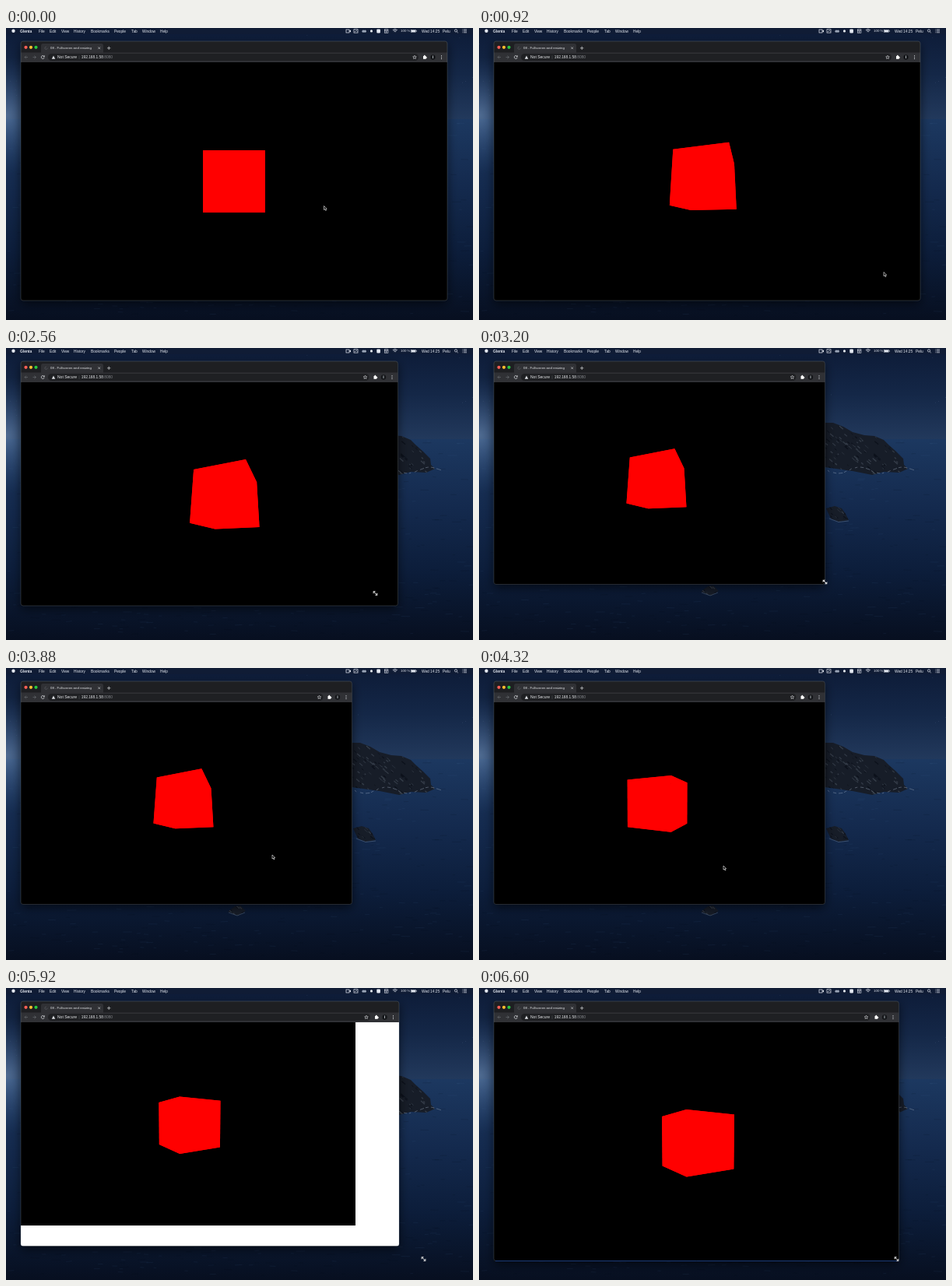
Animation, 600 px wide and 375 px high, one loop 6640 ms. Source, as an HTML page with a canvas:

```html
<!DOCTYPE html>
<html lang="en">
<head>
<meta charset="utf-8">
<title>Fullscreen and resizing</title>
<style>
html, body { margin: 0; width: 100%; height: 100%; overflow: hidden; background: #0a1630; }
canvas { display: block; }
</style>
</head>
<body>
<canvas id="stage" width="600" height="375"></canvas>
<script>
const c = document.getElementById('stage').getContext('2d');
const LOOP = 6640, STEP = 40;
const LEFT = 19, TOP = 17, PAGE = 44;

// Keyframes: time, then two values
const cursorKeys = [
  [160, 408.5, 228.5], [480, 396, 216], [560, 396, 216], [760, 470, 280], [920, 520, 313.5],
  [1360, 552, 337], [1600, 566.5, 349.5], [2260, 566.5, 349.5], [2560, 474.5, 315],
  [2780, 444.5, 300.5], [3280, 444.5, 300.5], [3400, 400, 254], [3700, 345, 240],
  [4120, 338, 240], [4320, 314, 254], [4480, 296, 255], [4560, 296, 255],
  [4760, 452, 293], [4900, 444.5, 301], [5480, 444.5, 301], [5880, 536.5, 348]
];
const windowKeys = [
  [2360, 567, 350], [2560, 503.5, 331], [2720, 482, 321], [2960, 444.5, 303.5],
  [5560, 444.5, 303.5], [5880, 505, 331.5], [6119, 505, 331.5], [6120, 539.5, 350.5]
];
const viewKeys = [
  [2440, 567, 350], [2560, 551.5, 345.5], [2720, 500, 330], [3000, 444.5, 303.5],
  [5800, 444.5, 303.5], [5920, 449, 305], [6279, 449, 305], [6280, 539.5, 350.5]
];
const orbitKeys = [
  [200, 0, 0], [500, 7, 9], [700, 11, 13], [920, 14.5, 15], [1200, 18.5, 16.4], [1500, 20, 16.9],
  [1900, 20.5, 17], [4120, 20.5, 17], [4200, 22, 10], [4320, 28, -1], [4480, 40, -2],
  [4640, 48, -2.2], [4880, 54, -2.3], [5200, 56.5, -2.3], [5500, 57, -2.3]
];

function at(keys, t) {
  const i = keys.findIndex(k => k[0] > t);
  if (i === 0) return keys[0].slice(1);
  if (i < 0) return keys[keys.length - 1].slice(1);
  const a = keys[i - 1], b = keys[i], u = (t - a[0]) / (b[0] - a[0]);
  return [a[1] + (b[1] - a[1]) * u, a[2] + (b[2] - a[2]) * u];
}

function seeded(s) {
  return () => (s = (s * 16807) % 2147483647) / 2147483647;
}

function rect(x, y, w, h, fill) {
  c.fillStyle = fill;
  c.fillRect(x, y, w, h);
}

function round(x, y, w, h, r, fill) {
  c.beginPath();
  c.roundRect(x, y, w, h, r);
  c.fillStyle = fill;
  c.fill();
}

function dot(x, y, r, fill) {
  c.beginPath();
  c.arc(x, y, r, 0, 7);
  c.fillStyle = fill;
  c.fill();
}

function trace(points) {
  c.beginPath();
  for (let i = 0; i < points.length; i += 2) c.lineTo(points[i], points[i + 1]);
}

function poly(points, fill) {
  trace(points);
  c.closePath();
  c.fillStyle = fill;
  c.fill();
}

function line(points, color, width = 0.7) {
  trace(points);
  c.strokeStyle = color;
  c.lineWidth = width;
  c.stroke();
}

function ring(x, y, r, color, from = 0, to = 7, width = 0.7) {
  c.beginPath();
  c.arc(x, y, r, from, to);
  c.strokeStyle = color;
  c.lineWidth = width;
  c.stroke();
}

function text(s, x, y, size, fill = '#e8eaed', weight = '') {
  c.font = `${weight} ${size}px "Liberation Sans", Arial, sans-serif`;
  c.fillStyle = fill;
  c.fillText(s, x, y);
}

function fade(y0, y1, stops) {
  const g = c.createLinearGradient(0, y0, 0, y1);
  stops.forEach((s, i) => g.addColorStop(i / (stops.length - 1), s));
  return g;
}

// A rock with seeded lighter cracks
function rock(points, seed, cracks) {
  const rnd = seeded(seed);
  const xs = points.filter((_, i) => i % 2 === 0), ys = points.filter((_, i) => i % 2);
  const x0 = Math.min(...xs), y0 = Math.min(...ys);
  const w = Math.max(...xs) - x0, h = Math.max(...ys) - y0;
  c.save();
  poly(points, '#171d28');
  c.clip();
  for (let i = 0; i < cracks; i++) {
    const x = x0 + rnd() * w, y = y0 + rnd() * h, n = 2 + rnd() * 5;
    line([x, y, x + n * 0.7, y + n * 0.6], rnd() < 0.5 ? '#333b47' : '#0c111b', 0.5 + rnd());
  }
  c.restore();
}

function desktop() {
  const rnd = seeded(77);
  rect(0, 0, 600, 117, fade(0, 117, ['#0d1b37', '#142747', '#22395c']));
  rect(0, 117, 600, 258, fade(117, 375, ['#1c3860', '#142a4e', '#0c1d3a', '#070f20']));
  for (let i = 0; i < 35; i++) dot(rnd() * 600, 9 + rnd() * 90, 0.3, 'rgba(190,210,240,.4)');
  for (let i = 0; i < 420; i++) {
    const x = rnd() * 600, y = 119 + rnd() * 250, n = 3 + rnd() * 9;
    line([x, y, x + n, y + rnd() - 0.5], rnd() < 0.5 ? 'rgba(70,105,155,.13)' : 'rgba(2,8,22,.16)', 0.8);
  }
  const glow = c.createRadialGradient(0, 112, 0, 0, 112, 75);
  glow.addColorStop(0, 'rgba(125,158,200,.5)');
  glow.addColorStop(1, 'rgba(60,95,145,0)');
  rect(0, 8, 90, 190, glow);
  rock([420, 95, 444, 96, 455, 96, 468, 101, 480, 108, 495, 112, 508, 113, 520, 118, 527, 125,
    536, 133, 545, 142, 546, 150, 551, 155, 540, 160, 520, 159, 505, 163, 480, 158, 444, 153, 420, 152], 9, 170);
  for (let i = 0; i < 16; i++) {
    const x = 448 + i * 7;
    line([x, 157 + 4 * Math.sin(i * 0.8), x + 2 + rnd() * 4, 157 + 4 * Math.sin(i * 0.8 + 0.5)],
      'rgba(170,185,205,.55)', 0.7);
  }
  rock([446, 206, 457, 203, 466, 206, 471, 213, 475, 221, 462, 223, 452, 219], 21, 25);
  line([450, 219, 462, 223.5, 475, 222], 'rgba(150,170,195,.5)', 0.6);
  rock([285, 313, 294, 306, 301, 305, 308, 312, 298, 318], 33, 14);
  line([286, 314, 297, 318, 307, 314], 'rgba(150,170,195,.5)', 0.6);
}

function menuBar() {
  const ink = '#e4e9f2';
  rect(0, 0, 600, 7.7, '#101c35');
  dot(9.5, 3.8, 2.2, ink);
  text('Glenta', 18, 5.5, 4.9, ink, 'bold');
  const items = { File: 42, Edit: 56, View: 71, History: 87, Bookmarks: 109, People: 139, Tab: 161, Window: 175, Help: 198 };
  for (const name in items) text(name, items[name], 5.5, 4.8, ink);
  c.strokeStyle = ink;
  c.lineWidth = 0.7;
  c.strokeRect(437, 2, 4, 4);
  rect(441.5, 2.8, 1.5, 2.4, ink);
  c.strokeRect(447, 1.7, 5, 4.4);
  line([448, 5, 450, 3, 451.5, 4.5], ink, 0.6);
  dot(459, 4.2, 1.6, '#9aa5b8');
  dot(461.3, 4.2, 1.6, '#9aa5b8');
  dot(469.5, 3.9, 1.6, ink);
  round(476.3, 1.4, 4.6, 5, 1, ink);
  c.strokeRect(486.3, 1.8, 4.6, 4.4);
  line([486, 3.3, 491, 3.3], ink);
  line([488.6, 3.3, 488.6, 6], ink);
  for (const r of [1.5, 3, 4.5]) ring(499.8, 6, r, ink, -2.3, -0.84);
  text('100 %', 507, 5.4, 4.4, ink);
  c.strokeStyle = ink;
  c.lineWidth = 0.5;
  c.strokeRect(520.3, 2.3, 6.2, 3.2);
  rect(520.9, 2.8, 5, 2.2, ink);
  rect(527, 3.2, 0.7, 1.4, ink);
  text('Wed 14:25', 534, 5.5, 4.8, ink);
  text('Pelu', 561, 5.5, 4.8, ink);
  ring(578, 3.4, 1.6, ink);
  line([579.2, 4.6, 580.8, 6.2], ink);
  for (const y of [2, 3.9, 5.8]) {
    rect(586.5, y - 0.4, 0.8, 0.8, ink);
    line([588, y, 592, y], ink);
  }
}

function arrow(x, y, dir, color) {
  line([x - 2 * dir, y, x + 2 * dir, y], color);
  line([x, y - 2, x + 2 * dir, y, x, y + 2], color);
}

function toolbar(right) {
  const ink = '#dadce0', dim = '#66696e';
  rect(LEFT, TOP, right - LEFT, 15, '#1e1f22');
  round(45, 20, 80, 13, [2.5, 2.5, 0, 0], '#303135');
  rect(LEFT, 31.5, right - LEFT, 12.5, '#303135');
  ['#ff5f57', '#febc2e', '#28c840'].forEach((fill, i) => dot(25.5 + i * 6.5, 24.8, 2.1, fill));
  ring(51.5, 25.8, 1.6, '#595c61', 0, 5);
  text('08 - Fullscreen and resizing', 57, 27.4, 4.3);
  line([118.3, 24.4, 121, 27.1], ink, 0.6);
  line([121, 24.4, 118.3, 27.1], ink, 0.6);
  line([130, 25.8, 134.4, 25.8], ink);
  line([132.2, 23.6, 132.2, 28], ink);
  arrow(26, 37.5, -1, dim);
  arrow(36.5, 37.5, 1, dim);
  ring(47.3, 37.5, 2, ink, 0.3, 5.5);
  poly([49.6, 35, 49.6, 37.3, 47.4, 37.3], ink);
  round(54, 33, right - 37 - 54, 9, 4.5, '#1f2023');
  poly([58.8, 39.7, 61, 35.5, 63.2, 39.7], ink);
  text('Not Secure', 66, 39.3, 5);
  line([94, 35.3, 94, 40], '#55585d', 0.5);
  text('192.168.1.58', 96.8, 39.3, 4.8);
  text(':8080', 124.9, 39.3, 4.8, '#85888d');

  const star = [];
  for (let i = 0; i < 11; i++) {
    const r = i % 2 ? 1.1 : 2.4, a = i * Math.PI / 5;
    star.push(right - 42 + r * Math.sin(a), 37.6 - r * Math.cos(a));
  }
  line(star, ink, 0.6);
  rect(right - 31, 36, 3.7, 3.8, '#fff');
  dot(right - 29.2, 35.6, 0.9, '#fff');
  dot(right - 27.1, 37.9, 0.9, '#fff');
  dot(right - 18.5, 37.5, 3.2, '#15171a');
  rect(right - 19, 35.5, 1, 3.5, '#a4a9ae');
  for (const y of [35.6, 37.5, 39.4]) dot(right - 7.5, y, 0.55, ink);
}

function cube(cx, cy, focal, yaw, pitch) {
  const sa = Math.sin(yaw), ca = Math.cos(yaw), sp = Math.sin(pitch), cp = Math.cos(pitch);
  const pts = [];
  for (let i = 0; i < 8; i++) {
    const x = (i & 1) - 0.5, y = (i >> 1 & 1) - 0.5, z = (i >> 2) - 0.5;
    const depth = x * sa + z * ca;
    const k = focal / (3 + y * sp - depth * cp);
    pts.push([cx + (x * ca - z * sa) * k, cy - (y * cp + depth * sp) * k]);
  }
  for (const face of ['0132', '4576', '0154', '2376', '0264', '1375'])
    poly([...face].flatMap(i => pts[i]), '#f00');
}

function browser(t) {
  const [right, bottom] = at(windowKeys, t), [vr, vb] = at(viewKeys, t);
  const [yaw, pitch] = at(orbitKeys, t).map(d => d * Math.PI / 180);
  const w = right - LEFT, h = bottom - TOP;
  c.save();
  c.shadowColor = 'rgba(0,0,0,.6)';
  c.shadowBlur = 13;
  c.shadowOffsetY = 4;
  round(LEFT, TOP, w, h, 3, '#000');
  c.restore();

  c.save();
  c.beginPath();
  c.roundRect(LEFT, TOP, w, h, 3);
  c.clip();
  rect(LEFT, PAGE, w, bottom - PAGE, vr < right - 1 ? '#fff' : '#000');
  rect(LEFT, PAGE, vr - LEFT, vb - PAGE, '#000');
  const half = (vb - PAGE) / 2;
  cube((LEFT + vr) / 2, PAGE + half, half / Math.tan(37.5 * Math.PI / 180), yaw, pitch);
  toolbar(right);
  c.restore();

  c.beginPath();
  c.roundRect(LEFT, TOP, w, h, 3);
  c.strokeStyle = 'rgba(150,160,175,.42)';
  c.lineWidth = 0.6;
  c.stroke();
  if (t >= 6280) line([LEFT + 2, bottom, right - 2, bottom], '#183f8c', 0.8);
}

function cursor(t) {
  const [x, y] = at(cursorKeys, t);
  c.save();
  c.translate(x, y);
  if ((t >= 1560 && t < 3320) || t >= 4840) {
    line([-1.8, -1.8, 1.8, 1.8], '#fff', 1);
    for (const s of [-1, 1]) {
      poly([2.8 * s, 2.8 * s, 2.8 * s, -0.4 * s, -0.4 * s, 2.8 * s], '#fff');
      poly([2 * s, 2 * s, 2 * s, 0.9 * s, 0.9 * s, 2 * s], '#111');
    }
  } else {
    const shape = [0, 0, 0, 5, 1.2, 4, 2.1, 6, 3, 5.6, 2.2, 3.7, 3.7, 3.6, 0, 0];
    poly(shape, '#000');
    line(shape, '#fff', 0.6);
  }
  c.restore();
}

function draw() {
  const t = Math.floor(performance.now() % LOOP / STEP) * STEP;
  desktop();
  menuBar();
  browser(t);
  cursor(t);
  requestAnimationFrame(draw);
}
draw();
</script>
</body>
</html>
```
